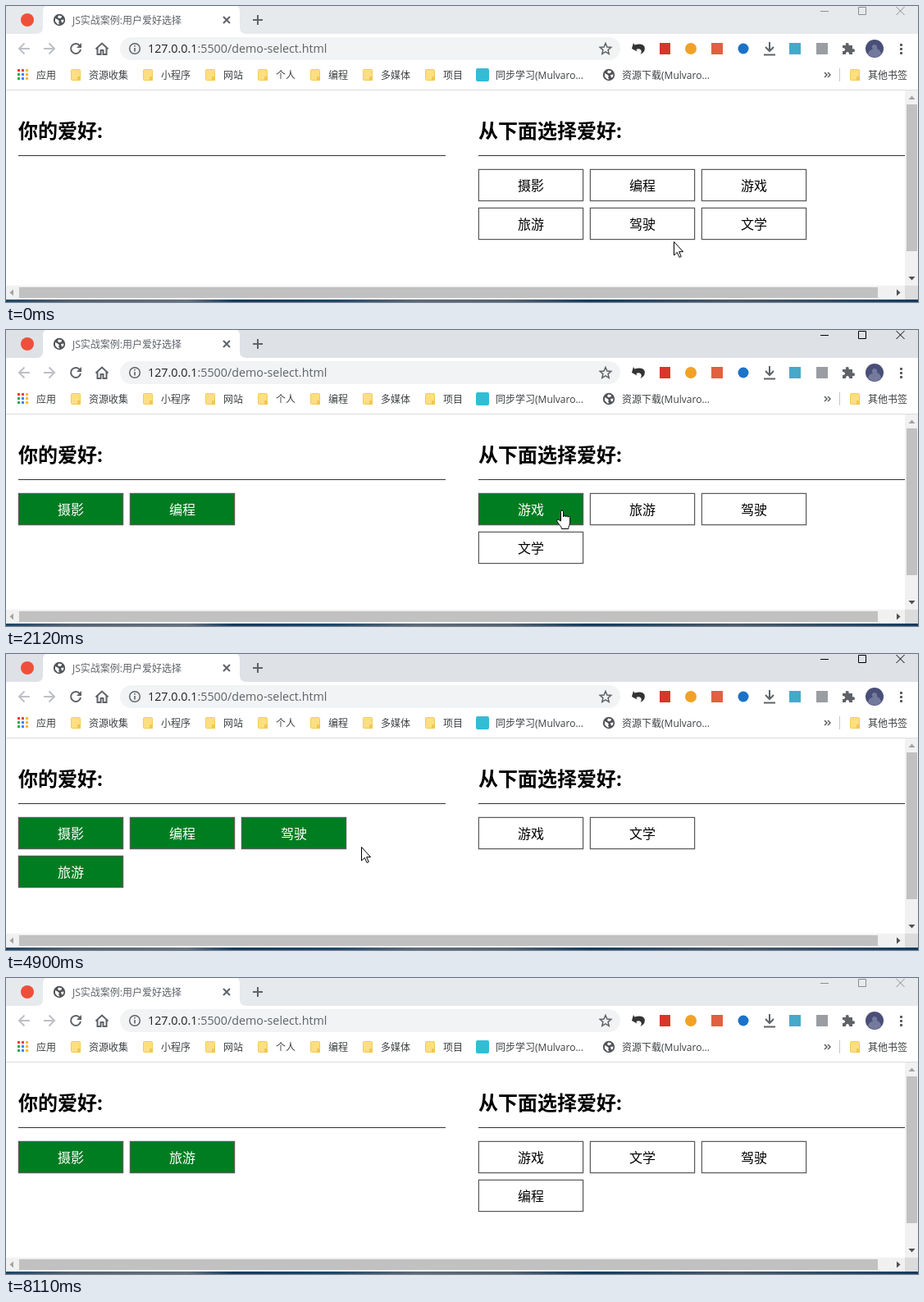
Recreate the animation shown at these times as an HTML page. Size 1112 by 361 pixels, loop 8190 ms.

```html
<!DOCTYPE html>
<html lang="zh-CN">
<head>
<meta charset="utf-8">
<title>用户爱好选择</title>
<style>
  html, body { margin: 0; width: 100%; height: 100%; overflow: hidden; background: #fff; }
  svg { display: block; }
  text { font: 12px "Open Sans", "Noto Sans CJK SC", "Noto Sans CJK", sans-serif; fill: #3c4043; }
  .heading { font-size: 24px; font-weight: bold; fill: #000; }
  .url { font-size: 14.3px; fill: #5f6368; }
  .item text { font-size: 16px; text-anchor: middle; fill: #000; }
  .item rect { fill: #fff; stroke: #5a5a5a; }
  .green rect { fill: #007d21; }
  .red rect { fill: #f00; }
  .green text, .red text { fill: #fff; }
  .item .shadow { fill: none; stroke: #000; stroke-opacity: .14; }
  .line { fill: none; stroke: #5f6368; stroke-width: 2; }
  .thin { stroke-width: 1.5; }
  .pointer path { fill: #fff; stroke: #000; }
</style>
</head>
<body>
<svg width="1112" height="361" viewBox="0 0 1112 361">
  <defs>
    <linearGradient id="desktop">
      <stop offset="0" stop-color="#1c4566"/><stop offset=".07" stop-color="#53606e"/>
      <stop offset=".2" stop-color="#64707c"/><stop offset=".25" stop-color="#123a5c"/>
      <stop offset=".36" stop-color="#1d4668"/><stop offset=".45" stop-color="#5d6975"/>
      <stop offset=".55" stop-color="#55626f"/><stop offset=".64" stop-color="#123a5c"/>
      <stop offset=".8" stop-color="#4a5a69"/><stop offset="1" stop-color="#123a5c"/>
    </linearGradient>
    <g id="globe">
      <circle r="7.2" fill="#505458"/>
      <path d="M-5-2L-2-.5 0 1.5-1 3 .5 5.5-2 5.3-5 2zM-1-5.6L3-4.7 2.5-2.5 0-1.7-2-3zM2 0L5.5-.5 5 2.5 3 3.5z" fill="#fff"/>
    </g>
    <g id="folder">
      <path d="M.5 1.5q0-1 1-1h9q1 0 1 1v12h-10q-1 0-1-1z" fill="#fddf82" stroke="#f3cb58"/>
      <path d="M8 9h4v5H8z" fill="#f3c74c"/>
    </g>
  </defs>

  <!-- title bar and tab -->
  <rect id="titlebar" width="1112" height="34"/>
  <path d="M37 34q8 0 8-8V7q0-8 8-8h224q8 0 8 8v19q0 8 8 8z" fill="#fff"/>
  <circle cx="26" cy="17" r="8" fill="#ee4f3a"/>
  <use href="#globe" x="65" y="17"/>
  <text x="81" y="21.5" style="fill:#5f6368">JS实战案例:用户爱好选择</text>
  <path class="line" d="M265 13l8 8m0-8l-8 8M301 17h12m-6-6v12"/>
  <path id="controls" fill="none" d="M993 6.5h10M1039.5 1.5h9v9h-9zM1085.5 1l10 10m0-10l-10 10"/>

  <!-- toolbar -->
  <path d="M0 34h1112v69H0z" fill="#fff"/>
  <path class="line" style="stroke:#bdc1c6" d="M29 52H16m6.5-6.5L16 52l6.5 6.5M46 52h13m-6.5-6.5L59 52l-6.5 6.5"/>
  <path class="line" d="M90 48.5a6 6 0 1 0 1 4.5M111.500 51v8h4v-5h3v5h4v-8M109.500 52.500l7.500-7 7.500 7"/>
  <path d="M92 45v6h-6z" fill="#5f6368"/>
  <rect x="139" y="38" width="610" height="28" rx="14" fill="#f1f3f4"/>
  <circle class="line thin" cx="157" cy="52" r="6.3"/>
  <path d="M156.2 48h1.6v1.6h-1.6zM156.2 51h1.6v4.5h-1.6z" fill="#5f6368"/>
  <text class="url" x="173" y="57"><tspan fill="#202124">127.0.0.1</tspan>:5500/demo-select.html</text>
  <path class="line thin" d="M731 45.5l1.9 4.5 4.9.4-3.7 3.2 1.1 4.8-4.2-2.5-4.2 2.5 1.1-4.8-3.7-3.2 4.9-.4z"/>
  <path d="M763 52l2-7 1.5 2.5q9-3 12 2 2 6-5 9.5 3-5-1-6.5-2-.5-4 .5l1 2.5z" fill="#333"/>
  <rect x="797" y="45" width="13" height="14" fill="#d9362b"/>
  <circle cx="835" cy="52" r="7" fill="#f2a126"/>
  <rect x="860" y="45" width="14" height="14" fill="#e2603f"/>
  <circle cx="899" cy="52" r="6.5" fill="#1a73c8"/>
  <path class="line" d="M931 44v11m-5-5l5 5 5-5M924 59.5h14"/>
  <rect x="955" y="45" width="14" height="14" fill="#46a9c9"/>
  <rect x="988" y="45" width="14" height="14" fill="#9a9da1"/>
  <path d="M1020 48h4q-1-3 1.7-3t1.800 3h4.500v4.500q3-1 3 1.700t-3 1.800v3h-4q0-3-2-3t-2 3h-4v-4q3 0 3-2t-3-2z" fill="#5f6368"/>
  <circle cx="1059" cy="52" r="11" fill="#4a4f78"/>
  <path d="M1051 59q1-6 6-6-3-4 1-6 5 0 4 5 5 2 5 7-8 7-16 0z" fill="#747a9d"/>
  <path d="M1090 46h3v3h-3zM1090 51h3v3h-3zM1090 56h3v3h-3z" fill="#5f6368"/>

  <!-- bookmarks -->
  <g id="bookmarks"></g>
  <rect x="573" y="76" width="16" height="16" rx="2" fill="#32bdd4"/>
  <use href="#globe" x="735" y="84"/>
  <path class="line thin" d="M998 81l3 3-3 3m4-6l3 3-3 3"/>
  <path d="M1016.5 76v16" stroke="#c4c7cb"/>
  <path d="M0 102.5h1112" stroke="#dadce0"/>

  <!-- page -->
  <text class="heading" x="15" y="160.5">你的爱好:</text>
  <text class="heading" x="576" y="160.5">从下面选择爱好:</text>
  <path d="M15 182.5h521M576 182.5h520" stroke="#333"/>
  <path d="M1096 103h16v255H0v-17h1096z" fill="#f1f1f1"/>
  <path d="M1096 341h16v17h-16z" fill="#dcdcdc"/>
  <path d="M1098 120h13v179h-13z" fill="#c1c1c1"/>
  <path id="thumb" d="M16 343h1047v13H16z"/>
  <path d="M1100.5 114h8l-4-4.5zM9 345.5v8l-4.5-4z" fill="#a3a3a3"/>
  <path d="M1100.5 330h8l-4 4.5zM1086 345.5v8l4.5-4z" fill="#505050"/>
  <g id="lists"></g>
  <rect y="358" width="1112" height="3" fill="url(#desktop)"/>
  <g id="pointer" class="pointer">
    <path id="arrow" d="M.5.5v16.5l3.8-3.5 2.8 6 2.2-1-2.7-5.8h5z"/>
    <path id="hand" d="M-1.5 13V1.5a1.5 1.5 0 0 1 3 0V8q0-1.5 1.5-1.5T4.5 8q0-1.2 1.4-1.2t1.4 1.5q0-1 1.2-1t1.2 1.5V15c0 3-2 4-2 7.5H-.5c0-3-3.5-5-5.5-9-1-2 1-3 2.2-1.8z"/>
  </g>
</svg>
<script>
const $ = id => document.getElementById(id);
const LOOP = 8190;
const hobbies = ['摄影', '编程', '游戏', '旅游', '驾驶', '文学'];
const clicks = [[750, '摄影'], [2030, '编程'], [3490, '驾驶'], [4350, '旅游'], [5540, '驾驶'], [6620, '编程']];

// Pointer hot spot: time, x, y
const path = [
  [0, 814, 287], [70, 808, 284], [600, 651, 213], [930, 651, 213], [1310, 740, 215], [1560, 740, 215],
  [1890, 678, 225], [2030, 678, 220], [2200, 678, 220], [2570, 792, 214], [2740, 792, 214],
  [3180, 869, 203], [3300, 869, 203], [3350, 876, 203], [3440, 876, 203], [3490, 876, 214],
  [3640, 877, 215], [3750, 877, 215], [3950, 700, 258], [4050, 700, 258], [4190, 731, 238],
  [4270, 731, 238], [4350, 752, 224], [4430, 752, 224], [4900, 433, 235], [4940, 433, 235],
  [5070, 364, 233], [5180, 364, 233], [5370, 367, 216], [5620, 367, 216], [5920, 281, 232],
  [6000, 281, 232], [6320, 255, 224], [6470, 245, 226], [6940, 245, 226], [7010, 309, 255],
  [7090, 309, 255], [7400, 338, 348], [7490, 342, 350], [7560, 346, 375]
];

function pointerAt(t) {
  const i = path.findIndex(p => p[0] > t);
  if (i < 0) return path[path.length - 1].slice(1);
  const [t0, x0, y0] = path[i - 1], [t1, x1, y1] = path[i];
  const k = (t - t0) / (t1 - t0);
  return [Math.round(x0 + (x1 - x0) * k), Math.round(y0 + (y1 - y0) * k)];
}

function listsAt(t) {
  const left = [], right = [...hobbies];
  for (const [time, name] of clicks) {
    if (t < time) break;
    const [from, to] = left.includes(name) ? [left, right] : [right, left];
    from.splice(from.indexOf(name), 1);
    to.push(name);
  }
  return { left, right };
}

const bookmarks = [
  [37, '应用'], [101, '资源收集', 79], [189, '小程序', 167], [265, '网站', 243], [329, '个人', 307],
  [393, '编程', 371], [457, '多媒体', 435], [533, '项目', 511], [597, '同步学习(Mulvaro...'],
  [751, '资源下载(Mulvaro...'], [1051, '其他书签', 1029]
];
const dots = ['#ea4335', '#ea4335', '#fbbc05', '#34a853', '#4285f4', '#fbbc05', '#34a853', '#4285f4', '#fbbc05'];
$('bookmarks').innerHTML =
  dots.map((c, i) => `<rect x="${14 + i % 3 * 5}" y="${77 + Math.floor(i / 3) * 5}" width="3" height="3" fill="${c}"/>`).join('') +
  bookmarks.map(([x, label, icon]) =>
    (icon ? `<use href="#folder" x="${icon}" y="77"/>` : '') + `<text x="${x}" y="88.5">${label}</text>`).join('');

function draw(t) {
  const [px, py] = pointerAt(t), { left, right } = listsAt(t);
  let overItem = false;

  const drawList = (names, originX, normal, hovered) => names.map((name, i) => {
    const x = originX + i % 3 * 136, y = 199 + Math.floor(i / 3) * 47;
    const over = px >= x && px < x + 128 && py >= y && py < y + 39;
    overItem ||= over;
    return `<g class="item ${over ? hovered : normal}" transform="translate(${x} ${y})">
      <rect class="shadow" x="-.5" y="-.5" width="129" height="40" rx="1"/>
      <rect x=".5" y=".5" width="127" height="38"/><text x="64" y="26">${name}</text></g>`;
  }).join('');

  const markup = drawList(left, 15, 'green', 'red') + drawList(right, 576, '', 'green');
  if (markup !== draw.last) $('lists').innerHTML = draw.last = markup;

  const active = t >= 600 && t < 8110;
  $('titlebar').setAttribute('fill', active ? '#dee1e6' : '#e7eaed');
  $('controls').setAttribute('stroke', active ? '#000' : '#8b8d90');
  $('thumb').setAttribute('fill', py >= 343 && py < 356 ? '#a8a8a8' : '#c1c1c1');
  $('pointer').setAttribute('transform', `translate(${px} ${py})`);
  $('hand').style.display = overItem ? '' : 'none';
  $('arrow').style.display = overItem ? 'none' : '';
}

function tick() {
  draw(performance.now() % LOOP);
  requestAnimationFrame(tick);
}
tick();
</script>
</body>
</html>
```
